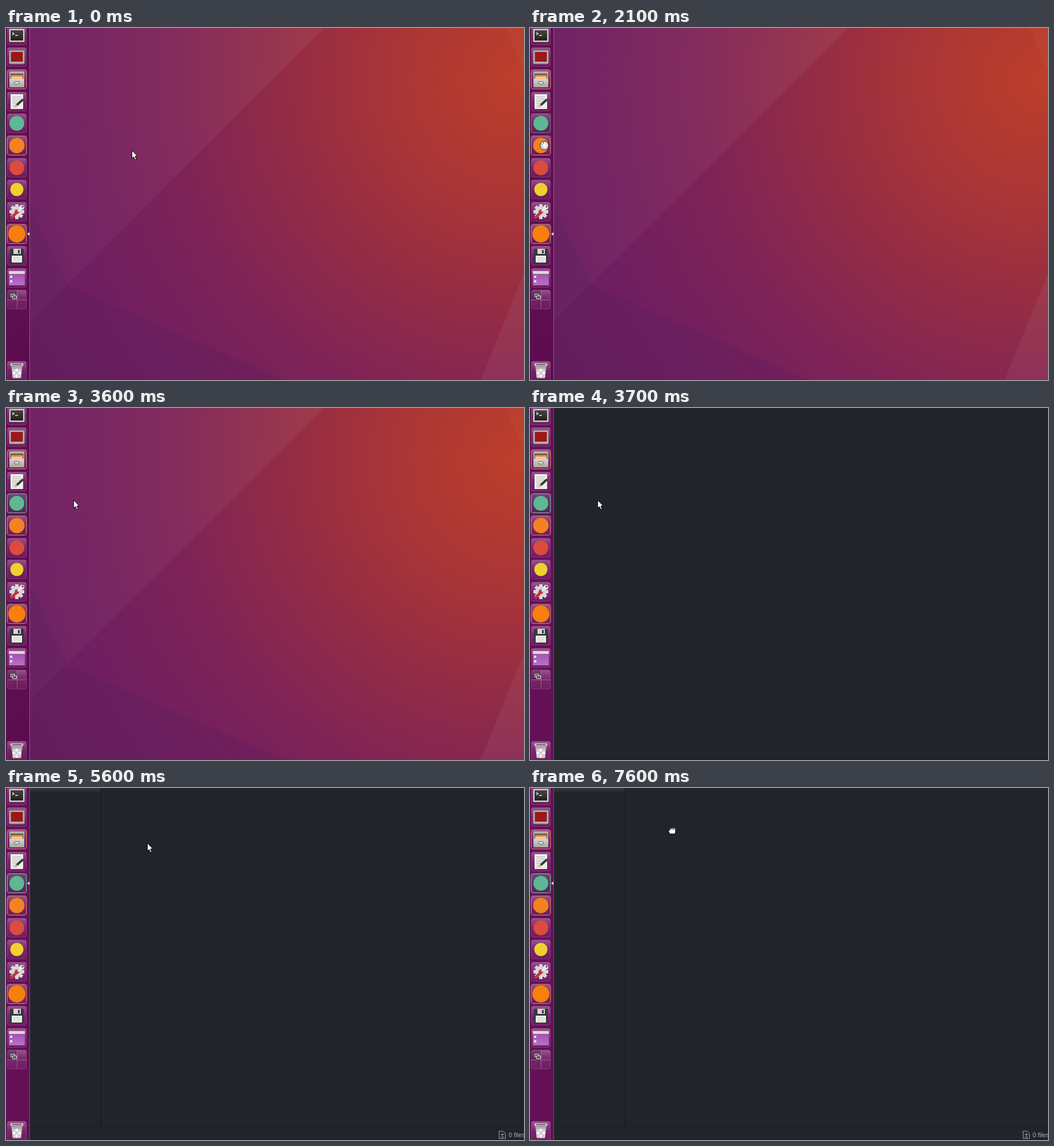
An HTML page with a canvas for the animation above (8000 ms loop, 907 px wide and 617 px high).

```html
<!DOCTYPE html>
<html lang="en">
<head>
<meta charset="utf-8">
<title>Opening an editor from the launcher</title>
<style>
  html, body { margin: 0; width: 100%; height: 100%; overflow: hidden; background: #21252b; }
  canvas { display: block; width: 100vw; height: 100vh; }
</style>
</head>
<body>
<canvas id="stage" width="907" height="617"></canvas>
<script>
const ctx = document.getElementById('stage').getContext('2d');
const W = 907, H = 617, LOOP = 8000, STEP = 100;
const BUSY_START = 1400, BUSY_END = 3400, WINDOW_OPEN = 3700, PANELS = 3800, STATUS = 5400, GRAB = 7400;

const easeOut = k => 1 - (1 - k) ** 3;
const linear = k => k;

// The pointer glides to each stop in turn.
const START = { x: 220, y: 214 };
const MOVES = [
  { end: 1200, lasts: 1000, x: 26, y: 167 },
  { end: 2200, lasts: 800, x: 25, y: 212 },
  { end: 3100, lasts: 900, x: 118, y: 170, ease: easeOut },
  { end: 3400, lasts: 200, x: 118, y: 161 },
  { end: 4400, lasts: 400, x: 176, y: 152 },
  { end: 4900, lasts: 400, x: 186, y: 117 },
  { end: 5400, lasts: 300, x: 215, y: 112 },
  { end: 5600, lasts: 100, x: 247, y: 96 },
  { end: 5800, lasts: 200, x: 232, y: 85 },
  { end: 6800, lasts: 500, x: 211, y: 27 },
  { end: 7600, lasts: 800, x: 249, y: 75 }
];

function pointerAt(t) {
  let { x, y } = START;
  for (const move of MOVES) {
    const k = Math.min(1, Math.max(0, 1 - (move.end - t) / move.lasts));
    const part = (move.ease || linear)(k);
    x += (move.x - x) * part;
    y += (move.y - y) * part;
  }
  return [Math.round(x), Math.round(y)];
}

function rect(x, y, w, h, fill) {
  ctx.fillStyle = fill;
  ctx.fillRect(x, y, w, h);
}

function trace(points) {
  ctx.beginPath();
  for (let i = 0; i < points.length; i += 2) ctx.lineTo(points[i], points[i + 1]);
}

function paint(fill, stroke) {
  if (fill) { ctx.fillStyle = fill; ctx.fill(); }
  if (stroke) { ctx.strokeStyle = stroke; ctx.stroke(); }
}

function poly(points, fill, stroke) {
  trace(points);
  ctx.closePath();
  paint(fill, stroke);
}

function line(points, color, width = 1) {
  trace(points);
  ctx.lineWidth = width;
  paint(null, color);
  ctx.lineWidth = 1;
}

function circle(x, y, r, fill, stroke) {
  ctx.beginPath();
  ctx.arc(x, y, r, 0, 7);
  paint(fill, stroke);
}

function box(x, y, w, h, r, fill, stroke) {
  ctx.beginPath();
  ctx.roundRect(x, y, w, h, r);
  paint(fill, stroke);
}

// A box centred on the origin.
const square = (size, r, fill, stroke) => box(-size / 2, -size / 2, size, size, r, fill, stroke);

function gradient(g, ...colors) {
  colors.forEach((c, i) => g.addColorStop(i / (colors.length - 1), c));
  return g;
}
const vertical = (y0, y1, ...colors) => gradient(ctx.createLinearGradient(0, y0, 0, y1), ...colors);

const wallpaperFill = gradient(ctx.createRadialGradient(900, 90, 0, 900, 90, 1020),
  '#bd3f2b', '#ab3635', '#942c45', '#7e2357', '#701f61', '#651d5d');
const sheen = gradient(ctx.createLinearGradient(0, 0, 557, 0), 'rgba(255,255,255,.02)', 'rgba(255,255,255,.055)');

function wallpaper() {
  rect(0, 0, W, H, wallpaperFill);
  poly([0, 225, 110, 452, 490, H, 0, H], 'rgba(85,28,88,.26)');
  poly([0, 0, 557, 0, 0, 556], sheen);
  poly([874, 0, W, 0, W, 74], 'rgba(255,150,80,.05)');
  poly([W, 430, W, H, 831, H], 'rgba(255,255,255,.05)');
}

function fileCounter() {
  ctx.save();
  ctx.translate(869, 608);
  poly([-5.5, -6.5, 1.5, -6.5, 5.5, -2.5, 5.5, 6.5, -5.5, 6.5], null, '#9da5b4');
  line([-3, -0.5, 3, -0.5], '#9da5b4');
  line([0, -3.5, 0, 2.5], '#9da5b4');
  line([-3, 4, 3, 4], '#9da5b4');
  ctx.restore();
  ctx.font = '11px "Liberation Sans", sans-serif';
  ctx.fillStyle = '#a8b0be';
  ctx.fillText('0 files', 880, 612);
}

function editorWindow(t) {
  rect(41, 0, W - 41, H, '#21252b');
  rect(41, H - 1, W - 41, 1, '#181a1f');
  if (t < PANELS) return;
  rect(42, 0, 124, 6, '#2c313a');
  rect(166, 0, 1, 595, '#181a1f');
  rect(41, 595, W - 41, 1, '#181a1f');
  if (t >= STATUS) fileCounter();
}

// Icons are drawn around the centre of their tile.
const disc = (r, color) => () => circle(0, 0, r, color);

function terminal() {
  box(-13.5, -11.5, 27, 23, 1.5, '#d6d3d0', '#777');
  rect(-11, -9, 22, 18, vertical(-9, 9, '#45443f', '#22211e'));
  line([-8, -5, -5, -3, -8, -1], '#fff', 1.3);
  line([-3, 0, 2, 0], '#fff', 1.3);
}

function monitor() {
  box(-13.5, -12, 27, 24, 2, '#b5b0ac', '#77706e');
  rect(-10.5, -9, 21, 17, '#9c171a');
}

function cabinet() {
  box(-13, -14, 26, 16, 2, '#b3afaa');
  rect(-11, -10, 22, 9, '#59534f');
  rect(-10, -8, 20, 3, '#f07b24');
  rect(-10, -5, 20, 4, '#f0c98c');
  box(-13, -1, 26, 15, 1.5, vertical(-1, 14, '#d8d6d2', '#a9a5a0'));
  box(-4, 4, 8, 4, 1, '#eee', '#55514d');
}

function notes() {
  rect(-11, -13, 22, 26, '#eeeeec');
  for (let y = -9; y < 10; y += 3) rect(-8, y, y < 2 ? 15 : 8, 1, '#b5b5b2');
  line([0, 6, 11, -4], '#383838', 4);
  poly([-4, 9, -2, 4, 2, 8], '#d7a967');
}

function settings() {
  for (let i = 0; i < 8; i++) {
    ctx.rotate(Math.PI / 4);
    rect(-3, -13, 6, 8, '#d9d7d7');
  }
  circle(0, 0, 10, '#d9d7d7');
  circle(0, 0, 4, '#8b5e82');
  ctx.lineCap = 'round';
  line([-9, 10, 3, -2], '#c8323c', 5);
  line([3, -2, 8, -7], '#eee', 4);
  circle(9, -8, 4, '#eee');
  circle(10, -9, 2, '#8b5e82');
}

function floppy() {
  box(-12, -12, 24, 25, 2, '#34383a');
  rect(-6, -12, 13, 9, '#d5d5d3');
  rect(2, -10, 3, 6, '#34383a');
  rect(-9, 0, 18, 12, '#f4f4ef');
  for (let y = 3; y < 11; y += 3) rect(-7, y, 14, 1, '#b9c3b4');
}

function appWindow() {
  rect(-14, -11, 28, 24, vertical(-11, 13, '#9e4cae', '#b673c5'));
  rect(-14, -12, 28, 5, '#ddd9d2');
  for (const y of [-4, 4]) rect(-12, y, 4, 4, '#eadcf0');
}

function workspaces() {
  line([0.5, -16, 0.5, 16], 'rgba(220,180,215,.4)');
  line([-17, 0.5, 17, 0.5], 'rgba(220,180,215,.4)');
  rect(-17, -16, 17, 16, 'rgba(40,20,40,.3)');
  for (const d of [0, 3]) box(d - 10.5, d - 9.5, 7, 5, 0, '#555', '#ddd');
}

function trash() {
  poly([-10, -9, 10, -9, 7, 13, -7, 13], 'rgba(205,200,205,.75)');
  for (let i = 0; i < 9; i++) circle(-5 + i % 3 * 5, -1 + (i / 3 | 0) * 5, 3, i % 2 ? '#f3f3f3' : '#cfcccf');
  box(-11.5, -13.5, 23, 5, 2, '#c9c5c9', '#908890');
  rect(-8, -12, 16, 2, '#77676f');
}

const ICONS = [
  terminal, monitor, cabinet, notes, disc(13, '#5fb894'), disc(13.5, '#f58220'), disc(13, '#dc4b3d'),
  disc(11.5, '#f0d02e'), settings, disc(15, '#f77f0d'), floppy, appWindow, workspaces, trash
];
const CABINET = 2, EDITOR = 4, BROWSER = 5, ACTIVE = 9, TRASH = 13;
const RUNNING = [CABINET, BROWSER, ACTIVE];
const tileY = i => i === TRASH ? 601 : Math.round(12.7 + 38.65 * i);

// Starting glow fades out and back in while the editor loads.
function glowAt(t) {
  if (t < BUSY_START) return 0;
  if (t >= WINDOW_OPEN) return 1;
  return 0.5 + 0.5 * Math.cos((t - 1450) / 2400 * 2 * Math.PI);
}

const tileFill = vertical(-16, 16, 'rgba(225,185,220,.4)', 'rgba(210,160,205,.16)', 'rgba(190,130,185,.12)');

function tile(running) {
  square(33, 3, tileFill, running ? '#b9786d' : 'rgba(215,160,205,.25)');
  if (running) square(35, 4, null, 'rgba(205,125,100,.4)');
}

function glow(alpha) {
  ctx.globalAlpha = alpha;
  square(33, 3, 'rgba(40,65,75,.4)', '#75a59d');
  square(35, 4, null, 'rgba(110,170,155,.4)');
  ctx.globalAlpha = 1;
}

function indicator(i) {
  const y = tileY(i);
  poly([37, y, 41, y - 3, 41, y + 3], '#e8dce6');
}

function launcher(t) {
  const covered = t >= WINDOW_OPEN;
  rect(0, 0, 41, H, covered ? '#641057' : 'rgba(94,8,78,.78)');
  rect(41, 0, 1, H, covered ? '#754a73' : '#8d5a87');
  ICONS.forEach((draw, i) => {
    ctx.save();
    ctx.translate(19, tileY(i));
    tile(RUNNING.includes(i));
    if (i === EDITOR) glow(glowAt(t));
    draw();
    ctx.restore();
  });
  if (t < BUSY_END) indicator(ACTIVE);
  if (t >= PANELS) indicator(EDITOR);
}

function arrow() {
  ctx.lineJoin = 'round';
  poly([0.5, 0.5, 0.5, 14.5, 3.5, 11.8, 6, 17.2, 8.3, 16.2, 6, 11, 10, 10.6], '#fff', '#000');
}

function busy(t) {
  circle(0, 0, 7.5, '#f4f4f2', '#111');
  ctx.rotate((t - BUSY_START) / 1000 * 2 * Math.PI);
  for (let i = 0; i < 8; i++) {
    ctx.rotate(Math.PI / 4);
    circle(4.8, 0, 0.9, `rgba(0,0,0,${0.15 + i * 0.11})`);
  }
}

function hand() {
  ctx.beginPath();
  ctx.moveTo(-4, 5.5);
  ctx.lineTo(-6.5, 1);
  ctx.quadraticCurveTo(-6.5, -2, -4.5, -1);
  for (let x = -4.5; x < 5; x += 2.5) ctx.quadraticCurveTo(x + 1.2, -9, x + 2.5, -3.5);
  ctx.lineTo(6, 2);
  ctx.lineTo(4.5, 5.5);
  ctx.closePath();
  paint('#fff', '#000');
  for (let x = -2; x < 4; x += 2.5) line([x, -4, x, -1], '#333', 0.8);
}

function pointer(t) {
  ctx.save();
  ctx.translate(...pointerAt(t));
  if (t >= BUSY_START && t < BUSY_END) busy(t);
  else if (t >= GRAB) hand();
  else arrow();
  ctx.restore();
}

function frame(now) {
  const t = Math.floor(now % LOOP / STEP) * STEP;
  wallpaper();
  if (t >= WINDOW_OPEN) editorWindow(t);
  launcher(t);
  pointer(t);
  requestAnimationFrame(frame);
}
requestAnimationFrame(frame);
</script>
</body>
</html>
```
